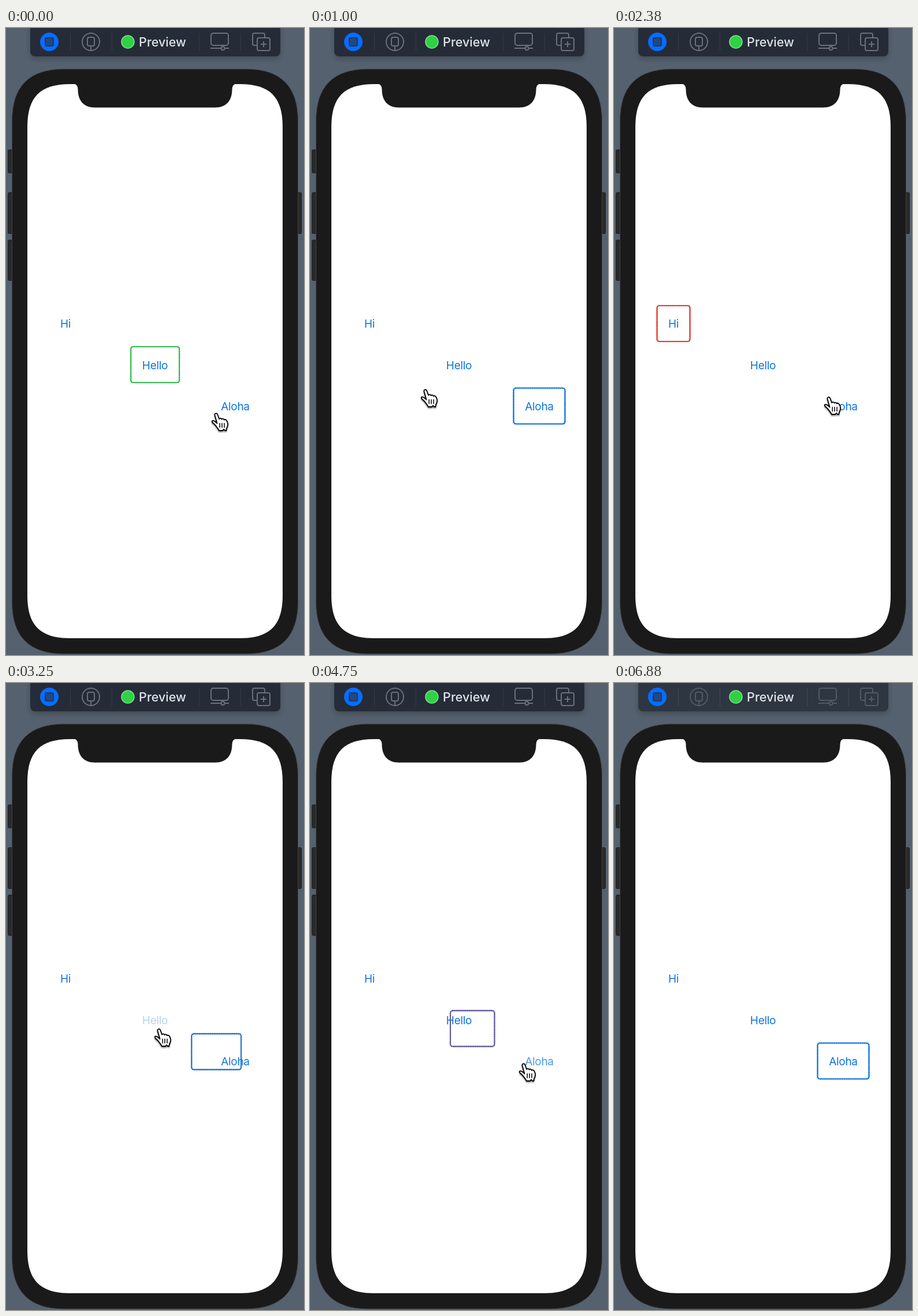
Animation, 516 px wide and 1084 px high, one loop 7010 ms. Source, as an HTML page:

```html
<!DOCTYPE html>
<html lang="en">
<head>
<meta charset="utf-8">
<title>Focus box</title>
<style>
  html, body { margin: 0; width: 100%; height: 100%; overflow: hidden; background: #55616f; }
  svg { display: block; width: 100%; height: 100%; }
  text { font-family: Inter, Roboto, sans-serif; }
  .bar { fill: #262b38; }
  .icon { fill: none; stroke: #6a707b; stroke-width: 2; }
  .solid { fill: #262b38; }
  .split { stroke: #343a46; stroke-width: 1; }
  .idle .bar, .idle .solid { fill: #2e3641; }
  .idle .icon { stroke: #525a65; }
  .idle .split { stroke: #4b545f; stroke-dasharray: 2 1; }
  .side { fill: #2a2a2a; stroke: #1c1c1c; }
  .label { font-size: 19px; letter-spacing: -.3px; fill: #0a74e0; text-anchor: middle; }
  #box { fill: none; }
  .dots { stroke-width: 2.7; stroke-linecap: round; stroke-dasharray: 0 3.2; }
</style>
</head>
<body>
<svg viewBox="0 0 516 1084" preserveAspectRatio="none">
  <defs>
    <filter id="soft" x="-20%" y="-50%" width="140%" height="200%"><feGaussianBlur stdDeviation="5"/></filter>
    <filter id="drop" x="-30%" y="-30%" width="170%" height="170%">
      <feDropShadow dx="0" dy="2" stdDeviation="1.2" flood-opacity=".45"/>
    </filter>
  </defs>
  <rect width="516" height="1084" fill="#55616f"/>

  <g id="toolbar">
    <rect x="42" y="-6" width="433" height="59" rx="8" opacity=".22" filter="url(#soft)"/>
    <rect class="bar" x="42" y="-12" width="433" height="61" rx="8"/>
    <path class="split" d="M111.5 9V40M183.5 9V40M334.5 9V40M406.5 9V40"/>
    <circle cx="75" cy="24" r="16" fill="#066dff"/>
    <rect x="68" y="17" width="14" height="14" rx="1.5" fill="#24477f" stroke="#12315f" stroke-width="1.5"/>
    <g class="icon">
      <circle cx="147" cy="24" r="15"/>
      <rect x="141" y="16" width="12" height="15" rx="3"/>
      <path d="M147 31V39"/>
      <rect x="355" y="9" width="30" height="21" rx="4"/>
      <path d="M354 35H372M379 35H386"/>
      <circle cx="375.500" cy="35" r="3"/>
      <rect x="427" y="9" width="21" height="21" rx="3"/>
      <rect class="solid" x="435" y="17" width="22" height="22" rx="3"/>
      <path d="M446 23V33M441 28H451"/>
    </g>
    <circle cx="211" cy="24" r="11" fill="#2fd145" stroke="#83dd90" stroke-width="1.500"/>
    <text x="271" y="32" text-anchor="middle" font-size="21.5" font-weight="500" fill="#e1e4e8">Preview</text>
  </g>

  <g class="side">
    <rect x="3.500" y="210.500" width="12" height="40" rx="2"/>
    <rect x="3.500" y="284.500" width="12" height="71" rx="2"/>
    <rect x="3.500" y="366.500" width="12" height="70" rx="2"/>
    <rect x="500" y="284.500" width="11.500" height="71" rx="2"/>
  </g>
  <path id="shell" fill="#1a1a1a" stroke="#3d4042"/>
  <path id="screen" fill="#fff"/>
  <path fill="#1a1a1a" d="M116 96Q124.500 97 124.500 106C124.500 125 134 137.500 154 137.500H362C382 137.500 391.500 125 391.500 106Q391.500 97 400 96Z"/>

  <text class="label" id="hi" x="103" y="518">Hi</text>
  <text class="label" id="hello" x="258" y="589.500">Hello</text>
  <text class="label" id="aloha" x="397" y="660.500">Aloha</text>

  <g id="box">
    <rect rx="4" stroke-width="1.700"/>
    <rect rx="4" class="dots"/>
  </g>

  <g id="hand">
    <circle id="ring" cx="10" cy="1" r="61" fill="none" stroke="#000" stroke-width="3"/>
    <g filter="url(#drop)" stroke="#000" stroke-linejoin="round" stroke-linecap="round">
      <path fill="#fff" stroke-width="1.800" d="M6.500 4.500C5.700 1 10 .2 11.200 3L14.200 11C14.800 9 17.800 9 18.500 11.500C19.500 9.800 22.300 10.200 22.800 12.600C24 11.300 26.600 12 27.200 14C29.500 18 30 20.500 28.300 24C27 26.500 26.500 28 26.300 31L23.500 30.500L22 28.700L20.300 31H13.800C13 28.500 12 27.500 10.300 25.500C8.500 23 7.600 21.500 5 19.300C.5 16 1 13.300 4 13.800C6.500 14.300 8 16 10.500 18.500Z"/>
      <path fill="none" stroke-width="1.500" d="M15.200 18.500V25.500M19 18.500V25.500M23 18.500V25.500"/>
    </g>
  </g>
</svg>

<script>
const LOOP = 7010, MOVE = 350, FADE = 300, IDLE_AT = 6500;
const $ = id => document.getElementById(id);

// Frame boxes: x, y, width, height, then stroke colour r, g, b
const boxes = {
  hi:    [74.5, 480, 57, 62, 226, 52, 42],
  hello: [216.2, 551, 84, 62, 44, 184, 72],
  aloha: [352.5, 622.5, 89, 62, 10, 114, 222]
};

// Button presses: pointer down, pointer up, button
const clicks = [
  [250, 480, 'aloha'], [1250, 1480, 'hi'], [2700, 2968, 'aloha'],
  [3100, 3211, 'hello'], [3740, 4000, 'hi'], [4360, 4550, 'aloha']
];

// Pointer path: time, x, y
const path = [
  [0, 355, 665], [250, 366, 650], [520, 366, 650], [1000, 191, 624],
  [1250, 93, 509], [1560, 93, 509], [2200, 355, 640], [2380, 363, 637],
  [2700, 370, 644], [2968, 370, 644], [3110, 258, 594], [3250, 256, 597],
  [3400, 256, 597], [3730, 92, 508], [4050, 92, 508], [4360, 362, 655],
  [4750, 361, 657], [5250, 361, 657], [6380, 420, -50]
];

const clamp = v => Math.min(1, Math.max(0, v));
const ease = v => (v = clamp(v), v * v * (3 - 2 * v));
const mix = (a, b, k) => a.map((v, i) => v + (b[i] - v) * k);

function smoothRect(x, y, w, h, r, k) {
  const a = r * k, R = x + w, B = y + h;
  return `M${x} ${y + r}C${x} ${y + a} ${x + a} ${y} ${x + r} ${y}H${R - r}` +
    `C${R - a} ${y} ${R} ${y + a} ${R} ${y + r}V${B - r}` +
    `C${R} ${B - a} ${R - a} ${B} ${R - r} ${B}H${x + r}` +
    `C${x + a} ${B} ${x} ${B - a} ${x} ${B - r}Z`;
}

function pointerAt(t) {
  const i = path.findIndex(p => p[0] > t);
  if (i < 0) return path[path.length - 1].slice(1);
  const [a, b] = [path[i - 1], path[i]];
  return mix(a, b, ease((t - a[0]) / (b[0] - a[0]))).slice(1);
}

function opacityAt(t, name) {
  const last = clicks.filter(c => c[2] === name && c[0] <= t).pop();
  return last ? 0.2 + 0.8 * clamp((t - last[1]) / FADE) : 1;
}

function draw(t) {
  // Each release blends the running motion towards its button
  const box = clicks.reduce((v, [, up, name]) => mix(v, boxes[name], ease((t - up) / MOVE)), boxes.hello);
  const [x, y, width, height, ...rgb] = box;
  for (const rect of $('box').children) {
    for (const [key, value] of Object.entries({ x, y, width, height })) rect.setAttribute(key, value);
  }
  $('box').setAttribute('stroke', `rgb(${rgb.map(Math.round)})`);

  for (const name in boxes) $(name).setAttribute('opacity', opacityAt(t, name));
  $('hand').setAttribute('transform', `translate(${pointerAt(t)})`);
  $('ring').style.display = clicks.some(([down, up]) => t >= down && t < up) ? '' : 'none';
  $('toolbar').classList.toggle('idle', t >= IDLE_AT);
}

// The picture holds for an eighth of a second, rounded to 10 ms
const startOf = n => Math.round(n * 12.5) * 10;
function held(t) {
  const n = Math.min(55, Math.floor(t / 125));
  return startOf(n) > t ? startOf(n - 1) : startOf(n);
}

$('shell').setAttribute('d', smoothRect(10.5, 71, 495, 1011, 90, 0.33));
$('screen').setAttribute('d', smoothRect(37, 97, 442, 958, 74, 0.3));

const begin = performance.now();
function tick() {
  draw(held((performance.now() - begin) % LOOP));
  requestAnimationFrame(tick);
}
tick();
</script>
</body>
</html>
```
